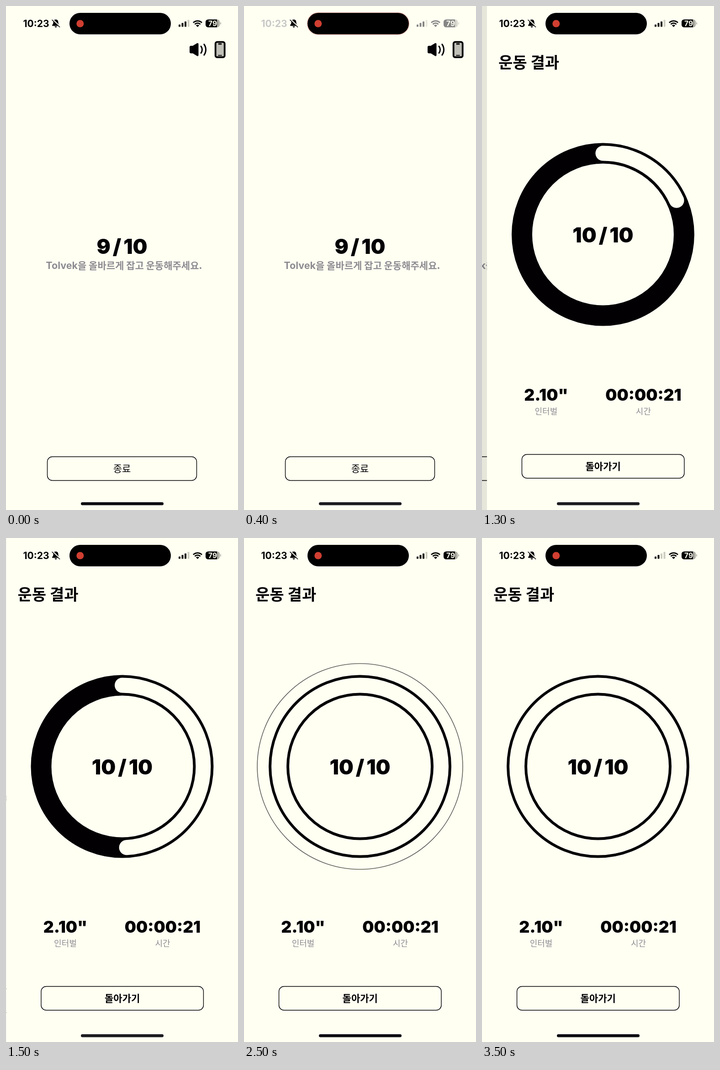
An HTML page with a canvas for the animation above (3.9 s loop, 508 px wide and 1102 px high).

```html
<!DOCTYPE html>
<html lang="ko">
<head>
<meta charset="utf-8">
<style>
html, body { margin: 0; width: 100%; height: 100%; overflow: hidden; background: #fffff2; }
canvas { display: block; }
</style>
</head>
<body>
<canvas id="stage" width="508" height="1102"></canvas>
<script>
const ctx = document.getElementById('stage').getContext('2d');
const W = 508, H = 1102, LOOP = 3900, STEP = 100, PUSH = 984;
const CREAM = '#fffff2', BLACK = '#020003', GRAY = '#8e8c92';
const FONT = 'Inter, "Noto Sans CJK KR", "Noto Sans CJK", sans-serif';
const HANGUL = '"Noto Sans CJK KR", "Noto Sans CJK", sans-serif';

const clamp = v => Math.max(0, Math.min(1, v));
const smooth = v => v * v * (3 - 2 * v);

// Cubic Bezier ease-in-out (0.42, 0, 0.58, 1), solved by bisection.
function easeInOut(x) {
  let lo = 0, hi = 1, u = 0.5;
  for (let i = 0; i < 24; i++) {
    u = (lo + hi) / 2;
    const bx = 1.26 * u * (1 - u) ** 2 + 1.74 * u * u * (1 - u) + u ** 3;
    if (bx < x) lo = u; else hi = u;
  }
  return smooth(u);
}

function text(str, x, y, size, weight, color = BLACK, align = 'center', family = FONT) {
  ctx.font = `${weight} ${size}px ${family}`;
  ctx.textAlign = align;
  ctx.fillStyle = color;
  ctx.fillText(str, x, y);
}

function counter(count, y) {
  ctx.wordSpacing = '-4px';
  text(`${count} / 10`, 254, y, 45, 900);
  ctx.wordSpacing = '0px';
}

function box(x, y, w, h, r, fill, stroke, width = 1.4) {
  ctx.beginPath();
  ctx.roundRect(x, y, w, h, r);
  if (fill) { ctx.fillStyle = fill; ctx.fill(); }
  if (stroke) { ctx.strokeStyle = stroke; ctx.lineWidth = width; ctx.stroke(); }
}

function arc(x, y, r, from, to, width, color = BLACK, cap = 'butt') {
  ctx.beginPath();
  ctx.arc(x, y, r, from, to);
  ctx.lineCap = cap;
  ctx.lineWidth = width;
  ctx.strokeStyle = color;
  ctx.stroke();
}

function line(x1, y1, x2, y2, width, color = BLACK) {
  ctx.beginPath();
  ctx.moveTo(x1, y1);
  ctx.lineTo(x2, y2);
  ctx.lineCap = 'round';
  ctx.lineWidth = width;
  ctx.strokeStyle = color;
  ctx.stroke();
}

function shape(path, color = BLACK) {
  ctx.fillStyle = color;
  ctx.fill(new Path2D(path));
}

function button(label, x, y, w, weight) {
  box(x, y, w, 52, 11, null, BLACK);
  text(label, x + w / 2, y + 33.5, 21, weight, BLACK, 'center', HANGUL);
}

function toolbar() {
  shape('M405 87H409L418 81.5Q421.5 80 421.5 84V107Q421.5 111 418 109L409 103.5H405Q402 103.5 402 100.5V90Q402 87 405 87Z');
  arc(417.5, 95.5, 12, -0.66, 0.66, 3, BLACK, 'round');
  arc(417.5, 95.5, 20, -0.62, 0.62, 3, BLACK, 'round');
  box(458.7, 78.7, 20, 33.3, 3.5, '#c0c0b8', BLACK, 3.8);
  line(466, 83, 471, 83, 3);
  line(465, 107.8, 472, 107.8, 1.8);
}

function workoutPage(count) {
  counter(count, 541.5);
  text('Tolvek', 157, 574.5, 21.5, 700, GRAY, 'right');
  text('을 올바르게 잡고 운동해주세요.', 157, 574.5, 21, 700, GRAY, 'left', HANGUL);
  button('종료', 90.5, 985.5, 327, 500);
}

function resultPage(t) {
  const cx = 254, cy = 499.5, top = -Math.PI / 2;
  text('운동 결과', 25, 136, 34, 700, BLACK, 'left');
  arc(cx, cy, 177.5, 0, 7, 45);
  const part = easeInOut(clamp((t - 1005) / 1000));
  if (part > 0) arc(cx, cy, 177.5, top, top + part * 2 * Math.PI, 33, CREAM, 'round');

  const age = t - 2273;
  if (age > 0 && age < 600) {
    arc(cx, cy, 200 + 0.11 * age, 0, 7, 1.6, `rgba(0,0,0,${1 - age / 600})`);
  }

  counter(10, 516.5);
  text('2.10"', 129.5, 862.5, 35.5, 900);
  text('인터벌', 129.5, 892.5, 18, 400, GRAY);
  text('00:00:21', 342.5, 862.5, 35.5, 900);
  text('시간', 342.5, 892.5, 18, 400, GRAY);
  button('돌아가기', 76.5, 980.5, 355.5, 700);
}

// Status items turn light over the dark screen, then fade back.
function tint(t, start) {
  const v = t < 100 ? 0 : Math.round(255 * (1 - smooth(clamp((t - start) / 300))));
  return `rgb(${v},${v},${v})`;
}

function bell(bg) {
  shape('M109 29.5C105 29.5 103.5 32.5 103.5 36C103.5 39.5 101.5 40.5 101 42.5Q101 43.5 102 43.5H116Q117 43.5 117 42.5C116.5 40.5 114.5 39.5 114.5 36C114.5 32.5 113 29.5 109 29.5ZM106.5 44.5H111.5Q111 47 109 47T106.5 44.5Z');
  line(102, 30, 118, 45, 3.4, bg);
  line(101, 30.5, 117.5, 46, 1.6);
}

function faint(alpha, draw) {
  ctx.globalAlpha = alpha;
  draw();
  ctx.globalAlpha = 1;
}

function statusBar(t, bg) {
  const ink = tint(t, 255);
  text('10:23', 66, 45.5, 21, 700, tint(t, 310));
  bell(bg);

  box(139, 15, 222, 47, 23.5, '#000');
  if (t >= 100 && t < 800) {
    box(138.5, 14.5, 223, 48, 24, null, `rgba(225,105,90,${0.7 * (1 - (t - 100) / 700)})`, 1.5);
  }
  ctx.beginPath();
  ctx.arc(162.3, 38.5, 8, 0, 7);
  ctx.fillStyle = '#d03f31';
  ctx.fill();

  const lit = [1, 1, 1 - 0.8 * clamp((t - 3200) / 300), 0.2];
  lit.forEach((alpha, i) => {
    const h = 5 + 3.4 * i;
    faint(alpha, () => box(378 + 6.5 * i, 45.5 - h, 4, h, 1, ink));
  });

  const from = -Math.PI * 0.75, to = -Math.PI * 0.25;
  arc(419.5, 46, 13.4, from, to, 2.8, ink);
  arc(419.5, 46, 8.6, from, to, 2.8, ink);
  arc(419.5, 46, 2.5, from, to, 5, ink);

  ctx.save();
  ctx.beginPath();
  ctx.roundRect(437, 29.5, 31, 17, 5.5);
  ctx.clip();
  faint(0.32, () => box(437, 29, 31, 18, 0, ink));
  box(437, 29, 25, 18, 0, ink);
  ctx.restore();
  faint(0.32, () => box(469, 35.5, 1.8, 5, 1, ink));
  text('79', 452.5, 43.5, 15.5, 700, bg);
}

function render(t) {
  const dark = t >= 100 && t < 300;
  const bg = dark ? '#000' : CREAM;
  const w = 0.0182 * Math.max(0, t - PUSH);
  const left = (1 + w) * Math.exp(-w);   // critically damped push
  const pushed = 1 - left;

  ctx.fillStyle = bg;
  ctx.fillRect(0, 0, W, H);
  if (!dark && left > 0.0002) {
    ctx.save();
    ctx.translate(-0.3 * W * pushed, 0);
    workoutPage(t < PUSH ? 9 : 10);
    ctx.restore();
    faint(clamp(1 - 2 * pushed), toolbar);
  }
  if (pushed > 0) {
    ctx.fillStyle = `rgba(0,0,0,${0.1 * pushed})`;
    ctx.fillRect(0, 0, W, H);
    ctx.save();
    ctx.translate(W * left, 0);
    ctx.fillStyle = CREAM;
    ctx.fillRect(0, 0, W, H);
    resultPage(t);
    ctx.restore();
  }
  statusBar(t, bg);
  box(164, 1085, 181, 6.5, 3.25, t < 100 || t > 1500 ? '#0c0c12' : '#1b1b20');
}

function tick() {
  const t = performance.now() % LOOP;
  render(Math.floor(t / STEP) * STEP);
  requestAnimationFrame(tick);
}
tick();
</script>
</body>
</html>
```
